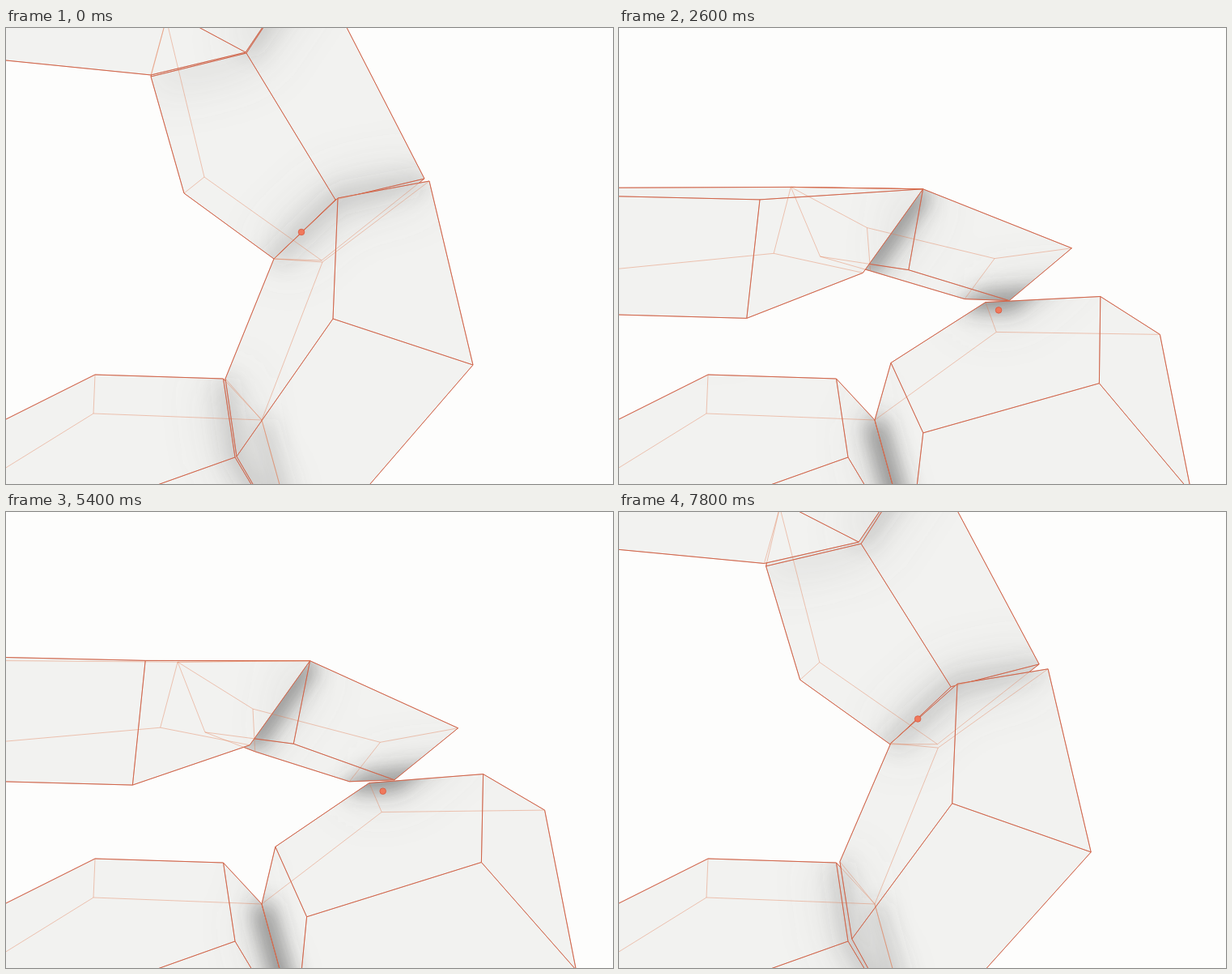
Write an HTML page that moves like this. It is 750 by 563 pixels and loops after 8 s.

```html
<!DOCTYPE html>
<html lang="en">
<head>
<meta charset="utf-8">
<title>Folding ring</title>
<style>
  html, body { margin: 0; width: 100%; height: 100%; overflow: hidden; background: #fdfdfc; }
  svg { display: block; width: 100vw; height: 100vh; }
  path { fill: none; }
  .edge, .ghost { stroke: #c65a48; stroke-width: 1; stroke-linejoin: round; }
  .ghost { stroke: #e0764c; stroke-opacity: .4; }
  .skin { fill: #f2f2f0; }
  .glow { stroke: #777; stroke-width: 46; stroke-opacity: .17; filter: url(#wide); }
  .shade { stroke: #444; stroke-width: 24; filter: url(#soft); }
</style>
</head>
<body>
<svg viewBox="0 0 750 563" preserveAspectRatio="none">
  <defs>
    <filter id="soft" filterUnits="userSpaceOnUse" x="-150" y="-150" width="1050" height="900"><feGaussianBlur stdDeviation="13"/></filter>
    <filter id="wide" filterUnits="userSpaceOnUse" x="-150" y="-150" width="1050" height="900"><feGaussianBlur stdDeviation="30"/></filter>
  </defs>
  <g id="solids"></g>
  <path id="ghosts" class="ghost"/>
  <circle id="joint" r="3.8" fill="#f0795c" stroke="#d9583f" stroke-width=".8"/>
</svg>
<script>
const PERIOD = 8000, STEP = 200, LEAD = 60, SWING = 3400;

const chains = text => text.split(", ").map(chain => chain.split(" "));

// Bodies from back to front. A point is x, y and, if it moves, its travel.
// `bend` bows the straight travel of every point of a body into an arc.
// A face seen from outside runs clockwise.
const bodies = [
  {
    points: {
      A1: [110, 428], A2: [268.5, 433], A3: [283, 530], A4: [325, 600], A5: [100, 595],
      A6: [108, 476], A7: [-80, 523], A8: [-60, 580], A9: [-60, 650],
      H: [316, 484], H2: [348, 600]
    },
    bend: () => [0, 0],
    faces: "A1 A2 A3 A5 A9 A7, A2 H H2 A4 A3, A3 A4 A9 A5, A1 A6 H A2, A1 A7 A8 A6, A6 A8 A9 H2 H",
    shade: "H H2, B1 B2 B7",
    glow: "H H2, B1 B2 B7, D3 D7"
  },
  {
    points: {
      C1: [331, 285, 111, 61], C2: [407, 212, 88, 163], C3: [517, 186, 45, 122],
      C4: [390, 287, 81, 0], C5: [220, 204, 106, 122], C6: [245, 184, 68, 87],
      C7: [179, 60, 85, 290], C8: [297, 31, 76, 351], C9: [198, -11, 15, 286],
      C10: [376, -88, 0, 392], joint: [365, 252, 123, 119]
    },
    bend: (dx, dy) => [14 + 0.035 * dx - 0.037 * dy, -22 + 0.23 * dx + 0.01 * dy],
    faces: "C1 C2 C3 C4, C2 C8 C10 C3, C1 C5 C7 C8 C2, C7 C9 C10 C8, C7 C5 C6 C9, C3 C10 C9 C6 C4, C1 C4 C6 C5",
    shade: "B1 B3 B4 B5, D1 C10",
    glow: "B3 B4 B5, D2 D1 C10"
  },
  {
    points: {
      B1: [271, 433, 87, -16], B2: [285, 529, 119, -25], B3: [331, 285, 145, 85],
      B4: [410, 210, 211, 180], B5: [523, 189, 155, 262], B6: [404, 359, 222, 127],
      B7: [325, 597, 55, 0], B8: [577, 416, 141, 220], B9: [391, 289, 85, 121],
      B10: [424, 593, 116, 47]
    },
    bend: (dx, dy) => [-8 + 0.09 * dx + 0.12 * dy, -0.115 * dx + 0.01 * dy],
    faces: "H B1 B2 B7 H2, B1 B3 B4 B6 B2, B3 B9 B5 B4, B4 B5 B8 B6, B2 B6 B8 B10 B7, H B9 B3 B1, B9 H H2 B10 B8 B5",
    shade: "A2 A3 A4, H H2, C1 C2 C3, C8 C2",
    glow: "A2 A3 A4, C1 C2 C3"
  },
  {
    points: {
      D1: [296, 30, 7, 374], D2: [179, 58, 16, 306], D3: [128, -60, 39, 565],
      D4: [135, -364, 51, 771], D5: [-50, -68, 0, 365], D6: [-40, 36, 47, 360],
      D7: [-110, -62, 0, 558], D8: [-110, -366, 0, 765]
    },
    bend: () => [0, -19],
    faces: "C10 C9 D2 D1, C10 D1 D3 D4, D4 D3 D7 D8, C9 C10 D4 D8 D5, D1 D2 D6 D7 D3, C9 D5 D6 D2, D5 D8 D7 D6",
    shade: "",
    glow: "C8 C10"
  }
];

function make(tag, parent, attrs = {}) {
  const node = document.createElementNS("http://www.w3.org/2000/svg", tag);
  for (const name in attrs) node.setAttribute(name, attrs[name]);
  return parent.appendChild(node);
}

const solids = document.getElementById("solids");
const ghosts = document.getElementById("ghosts");
const joint = document.getElementById("joint");

bodies.forEach((body, i) => {
  for (const part of ["faces", "shade", "glow"]) body[part] = body[part] ? chains(body[part]) : [];
  const clip = make("clipPath", solids, { id: "clip" + i });
  const line = (name, parent = solids) => make("path", parent, { class: name });
  body.paths = { clip: make("path", clip), skin: line("skin") };
  const tint = make("g", solids, { "clip-path": `url(#clip${i})` });
  body.paths.glow = line("glow", tint);
  body.paths.shade = line("shade", tint);
  body.paths.edges = line("edge");
});

function placePoints(t) {
  const at = {};
  const bow = 4 * t * (1 - t);
  for (const { points, bend } of bodies) {
    for (const name in points) {
      const [x, y, dx = 0, dy = 0] = points[name];
      const [bx, by] = bend(dx, dy);
      at[name] = [x + dx * t + bx * bow, y + dy * t + by * bow];
    }
  }
  return at;
}

function area(points) {
  return points.reduce((sum, [x, y], i) => {
    const [nx, ny] = points[(i + 1) % points.length];
    return sum + x * ny - nx * y;
  }, 0);
}

function draw(time) {
  const phase = (Math.floor(time / STEP) * STEP + LEAD) % PERIOD;
  const fold = Math.min(phase, PERIOD - phase);
  const at = placePoints((fold - LEAD) / SWING);
  const trace = names => "M" + names.map(n => at[n].map(v => v.toFixed(1)).join(" ")).join("L");
  const shadeOpacity = 0.15 + 0.43 * Math.min(1, fold / 1600);
  let allEdges = "";

  for (const { faces, shade, glow, paths } of bodies) {
    const seen = new Map();
    let outline = "", visible = "";
    for (const face of faces) {
      const front = area(face.map(n => at[n])) > 0;
      if (front) outline += trace(face) + "Z";
      face.forEach((n, i) => {
        const edge = [n, face[(i + 1) % face.length]].sort().join(" ");
        seen.set(edge, seen.get(edge) || front);
      });
    }
    for (const [edge, front] of seen) {
      const segment = trace(edge.split(" "));
      allEdges += segment;
      if (front) visible += segment;
    }
    paths.clip.setAttribute("d", outline);
    paths.skin.setAttribute("d", outline);
    paths.edges.setAttribute("d", visible);
    paths.glow.setAttribute("d", glow.map(trace).join(""));
    paths.shade.setAttribute("d", shade.map(trace).join(""));
    paths.shade.setAttribute("stroke-opacity", shadeOpacity);
  }

  ghosts.setAttribute("d", allEdges);
  joint.setAttribute("cx", at.joint[0]);
  joint.setAttribute("cy", at.joint[1]);
}

const start = performance.now();
function tick() {
  draw((performance.now() - start) % PERIOD);
  requestAnimationFrame(tick);
}
tick();
</script>
</body>
</html>
```
